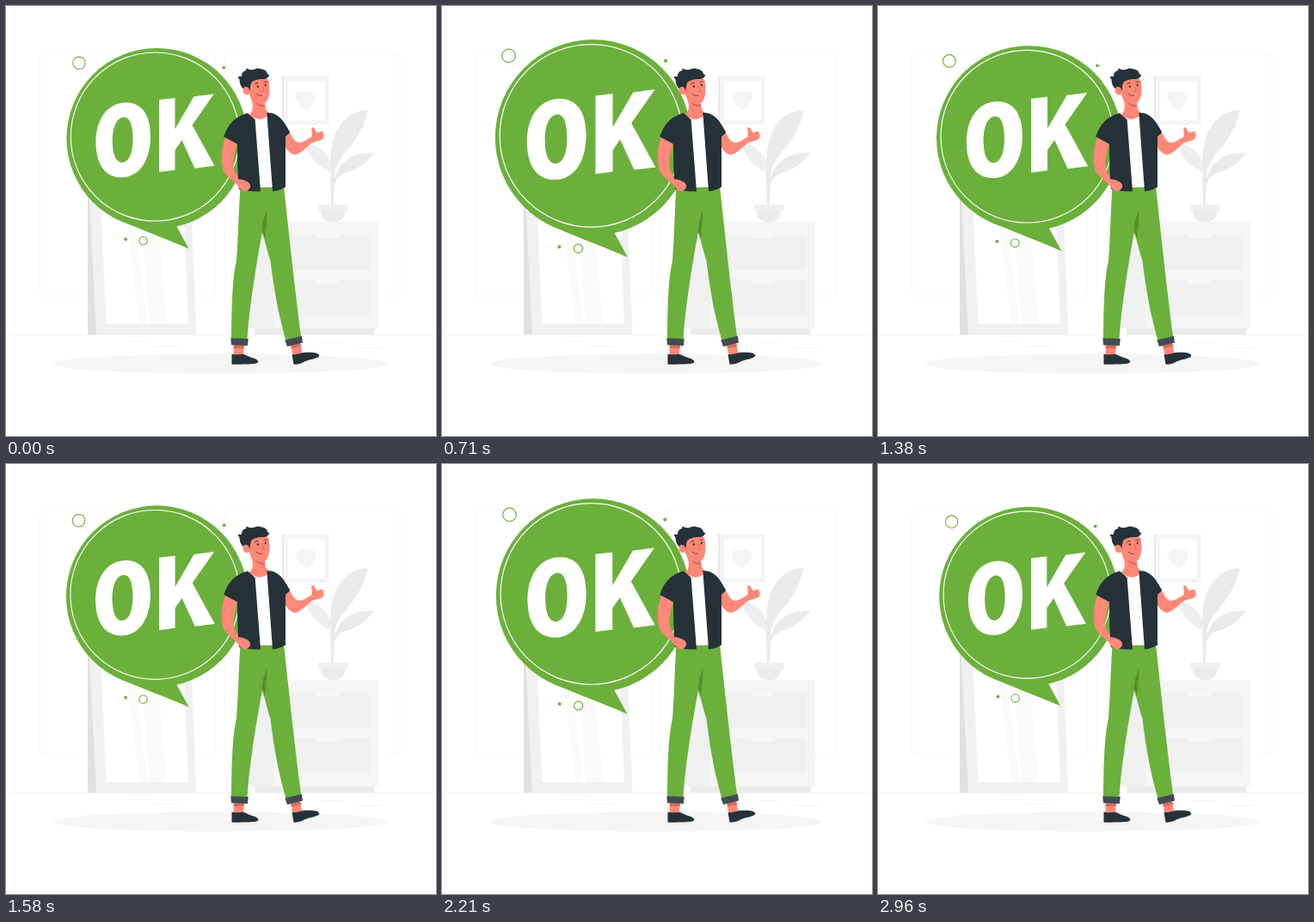
Recreate the animation shown at these times as an HTML page with a canvas. Size 500 px wide and 500 px high, loop 3.04 s.

```html
<!DOCTYPE html>
<html lang="en">
<head>
<meta charset="utf-8">
<title>OK</title>
<style>
html, body { margin: 0; width: 100%; height: 100%; overflow: hidden; background: #fff; }
canvas { display: block; width: 500px; height: 500px; }
</style>
</head>
<body>
<canvas id="stage" width="500" height="500"></canvas>
<script>
const canvas = document.getElementById('stage');
const ctx = canvas.getContext('2d');
const ratio = window.devicePixelRatio || 1;
canvas.width = canvas.height = 500 * ratio;

const GREEN = '#6bb03b', DARK = '#263238', SKIN = '#ff8878', CUFF = '#414c52';
const LOOP = 3040, STEP = 1000 / 24, LAST = 71;
const PULSE = 3000, LEAD = 55, SWELL = 0.11;
const PIVOT = [172.5, 166];

function fill(d, color) {
  ctx.fillStyle = color;
  ctx.fill(new Path2D(d), 'evenodd');
}
function line(d, color, width = 1) {
  ctx.strokeStyle = color;
  ctx.lineWidth = width;
  ctx.lineCap = 'round';
  ctx.stroke(new Path2D(d));
}
function rect(x, y, w, h, color) {
  ctx.fillStyle = color;
  ctx.fillRect(x, y, w, h);
}
function oval(x, y, rx, ry, color, turn = 0) {
  ctx.beginPath();
  ctx.ellipse(x, y, rx, ry, turn, 0, Math.PI * 2);
  ctx.fillStyle = color;
  ctx.fill();
}
function ring(x, y, r, color, width) {
  ctx.beginPath();
  ctx.arc(x, y, r, 0, Math.PI * 2);
  ctx.strokeStyle = color;
  ctx.lineWidth = width;
  ctx.stroke();
}

function drawRoom() {
  ctx.strokeStyle = '#f8f8f8';
  ctx.lineWidth = 1;
  for (const x of [39, 254]) {
    ctx.beginPath();
    ctx.roundRect(x, 55.3, 204, 282, 4);
    ctx.stroke();
  }
  rect(0, 382.2, 500, 0.5, '#ebebeb');
  for (const [x, y, w] of [[143, 389, 23], [171, 395, 30], [368, 391, 24], [408, 397.5, 30]])
    rect(x, y, w, 0.5, '#ebebeb');
}

function drawMirror() {
  fill('M95 190H213.5L221.5 382.3H95Z', '#f0f0f0');
  fill('M95 190L105 382.3H95Z', '#e0e0e0');
  fill('M109 200H205L212 370H116.5Z', '#fff');
  fill('M137 225H147L164 370H155.5Z', '#fafafa');
  fill('M156 225H174L187 370H167Z', '#fafafa');
}

function drawPicture() {
  rect(321, 82, 54.5, 56, '#f4f4f4');
  rect(321, 82, 2, 56, '#e8e8e8');
  rect(328, 87.3, 42.5, 45.5, '#fff');
  fill('M349 121.500C342 117 337.500 112 337.300 106C337.200 100 343 98 349 101C355 98 360.500 100 360.400 106C360 112 355 117 349 121.500Z', '#f4f4f4');
}

function drawDresser() {
  rect(289, 374, 139.5, 8.3, '#ebebeb');
  rect(283, 251, 29, 124, '#f0f0f0');
  rect(311, 251, 123, 124, '#f5f5f5');
  for (const y of [266, 318.5]) {
    rect(325, y, 98.5, 41, '#f0f0f0');
    fill(`M358 ${y}H388L384.5 ${y + 4}H361.5Z`, '#f7f7f7');
  }
}

function drawPlant() {
  const leaf = '#eaeaea';
  fill('M376.500 185L378 232H381L382.500 187Z', leaf);
  fill('M377.500 193C376 165 380 149 392 134C401 124 413 120.500 420.500 121.500C418 136 409 153 400 164C392 173 385 181 382.500 193Z', leaf);
  fill('M381 207C383 191 391 180 404 174C413 171 422 170.500 428 171C421 180 412 188 401 192C392 195 385 198 382 207Z', leaf);
  fill('M348.500 160C360 160 378 169 379 194C365 188 352 177 348.500 160Z', '#eee');
  fill('M366 236H394.500C395 246 390 251.500 380 251.500C371 251.500 365 245 366 236Z', '#ebebeb');
  rect(363, 231, 34.5, 7, '#f0f0f0');
}

function drawBubble(scale) {
  ctx.save();
  ctx.translate(...PIVOT);
  ctx.scale(scale, scale);
  ctx.translate(-PIVOT[0], -PIVOT[1]);

  oval(175.4, 153.9, 105, 105, GREEN);
  fill('M124 245C150 258 181 268.500 212.500 282.200L199 257.300L190 240Z', GREEN);
  ring(173.3, 152, 98, '#fff', 1.1);

  fill('M104.500 160C104 132 118 112.300 140 112.300C158 112.300 168 127 168 151C168 180 155 199.300 134 199.300C116 199.300 105 185 104.500 160Z'
    + 'M123.800 158C124 173 128 182.500 135.500 182C144 181 147.800 169 147.500 152C147 137 143.500 128.500 136.500 129.200C128 130.500 123.600 142 123.800 158Z', '#fff');
  fill('M178 109L196.500 107V143L218.500 105.300L241.800 102.300L216.500 138.500L242.500 185.800L219.500 188.700L204.500 156L196.500 167.500V190.700L178 193Z', '#fff');

  ring(85, 66.3, 7.2, GREEN, 1.1);
  ring(159.6, 273, 4.7, GREEN, 1.1);
  oval(253.3, 71.6, 1.9, 1.9, GREEN);
  oval(139.2, 271.2, 1.9, 1.9, GREEN);
  ctx.restore();
}

function drawLegs() {
  fill('M265 392H277L276 407H264.500Z', SKIN);
  fill('M331 393L342 391L344.500 405L333.500 407Z', SKIN);
  fill('M264.800 394.500H276.800L276.500 398H264.600Z', '#d9685e');
  fill('M331.200 394.500L342.300 392.500L343 396L332 398Z', '#d9685e');
  fill('M262.500 404.500C268 406.500 273 404 278 405.500C284 409 293 410 293.300 413.500C293.500 416 290 416.700 262.500 416.700Z', DARK);
  fill('M332.500 405C339 406 344 402.500 350 402.800C356 402.800 364 403 364.300 406.500C364 410 352 411 347 413.500C343 416 338 417 334.500 416.700Z', DARK);

  fill('M272.500 209C270.500 240 270 270 268 296C262.500 320 262.500 355 262 388H280.500C283 350 290 305 298 263C302 276 304 286 307.500 296C312 335 318 363 326 391L343.500 387C337 340 328.500 260 323 209Z', GREEN);
  fill('M303 238C299 248 297.500 256 298 263L301 270C302 258 304 248 303 238Z', '#55902c');
  fill('M261.300 386.300L281.800 387L280.800 395L262 394.300Z', CUFF);
  fill('M324.300 388.500L344 383.800L345 391.500L327 396Z', CUFF);
}

function drawBody() {
  // raised arm with thumb
  fill('M323 151L330 147C333 154 337 158.500 340.500 159C345 159 351 155 355.500 152C356.500 148 354.500 144 355.500 141C358.500 140.500 360.500 145 361 147.500L367.500 145.500C370 148 370.500 153 368 155C363 157.500 358 157.500 354.500 160C348 166 341 172.500 336 173C330 172 326 167 323 160Z', SKIN);
  line('M361 147.500C359 148 357.500 149 357 151', '#e0685d', 0.7);

  fill('M286 129L306 126L312 210.500L294 211Z', '#fff');
  fill('M284 106L301 110C301 117 302 121 305 124C305 131 292 136 283 126C288 122 288 114 284 106Z', SKIN);
  fill('M289 110.500C293 114 297 115 301 114.500L301.300 117C296 118 291 115.500 289 110.500Z', '#e0685d');

  // arm resting on the hip
  fill('M255 152C249.500 168 250 182 253 192C258 199 265 204 272 211C276 216.500 281 216.500 284.300 211C284.500 206 279 203 274 202C268.500 198 265 192 264.300 186C264 177 267 168 269 157Z', SKIN);
  line('M277 210L281 206.500', '#e0685d', 0.7);

  fill('M281 124.500C267 128 258 137 253.300 152L269 160.500C269 180 269.500 198 271 213C279 215 287 215.800 296 215.500L289.600 132Z', DARK);
  fill('M303.300 124C317 123.500 324 135 330.300 147L325 152L325 210.500C320 213.500 315 215 310 215.500Z', DARK);
  // hand in front of the vest
  fill('M265 202C269 200.500 274 201 279 203.500C285 206 285.500 211 282 213.500C279 216.500 275 216 271 211Z', SKIN);
}

function drawHead() {
  fill('M280 90C284 81 303 80 305.500 87C307.300 97 306.500 106 303 111C300 114.500 293 113.500 288 110.500C284 108 281 100 280 90Z', SKIN);
  fill('M271.500 85C270 84 269.500 82.500 270.500 81.500C272 82.500 273.500 82 274 81.500C274 78 276 75.500 279.500 75C279 74 279 73 280 72.500C282 74 286 75 289 73.500C292 72 295 72 297 73.500C300 73.500 303.500 75.500 304 79L306 80.300C305.800 83 303 85.300 298 85C294 84.700 289 86 285.500 88.500C283.500 92 284.500 95.500 283 99.500L279 98C274 96 271.500 91 271.500 85Z', DARK);
  oval(279.4, 98.6, 3.8, 4.8, SKIN, -0.3);
  oval(292.8, 93.6, 1, 1.4, DARK);
  oval(301.7, 92, 1, 1.4, DARK);
  line('M289.300 91.200C290.300 89.900 291.500 89.400 293 89.500', DARK, 0.9);
  line('M299.800 88.600C301 87.700 302.300 87.900 303.300 88.600', DARK, 0.9);
  line('M298 94C298.800 96 300 97.700 300.800 98.800L298.300 99.600', '#e0564d', 0.8);
  line('M291 102.300C293 104.300 295.300 104.700 297.700 103.900', DARK, 0.7);
}

// quick swell, slow fall, then a quick swell and quick fall
function pulse(ms) {
  const p = (ms % PULSE) / PULSE;
  let rise;
  if (p < 0.2) rise = p / 0.2;
  else if (p < 0.6) rise = (0.6 - p) / 0.4;
  else if (p < 0.8) rise = (p - 0.6) / 0.2;
  else rise = (1 - p) / 0.2;
  return 1 + SWELL * rise;
}

function draw(t) {
  const step = Math.min(LAST, Math.floor((t + 5) / STEP));
  ctx.setTransform(ratio, 0, 0, ratio, 0, 0);
  rect(0, 0, 500, 500, '#fff');
  drawRoom();
  drawMirror();
  drawPicture();
  drawDresser();
  drawPlant();
  oval(249.5, 416, 193.5, 11.5, '#f5f5f5');
  drawBubble(pulse(step * STEP + LEAD) / pulse(LEAD));
  drawLegs();
  drawBody();
  drawHead();
}

const start = performance.now();
function tick() {
  draw((performance.now() - start) % LOOP);
  requestAnimationFrame(tick);
}
tick();
</script>
</body>
</html>
```
